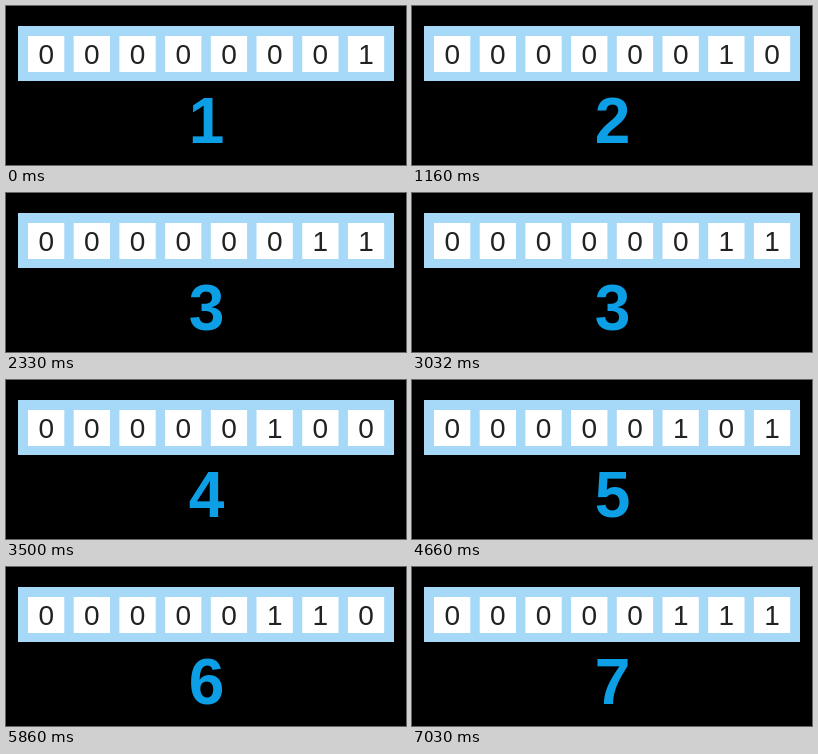
Animation, 400 px wide and 159 px high, one loop 8000 ms. Source, as an HTML page:

```html
<!DOCTYPE html>
<html lang="en">
<head>
<meta charset="utf-8">
<title>Binary counter</title>
<style>
  html, body { margin: 0; width: 100%; height: 100%; overflow: hidden; background: #000; }
  svg { display: block; width: 100vw; height: 100vh; }
  text { font-family: "Liberation Sans", Arial, sans-serif; text-anchor: middle; }
  .bit { font-size: 28px; fill: #222; }
  #value { font-size: 64px; font-weight: bold; fill: #0c9fe5; }
</style>
</head>
<body>
<svg viewBox="0 0 400 159">
  <rect x="12" y="20" width="376" height="55" fill="#a5d9f7"/>
  <g id="cells"></g>
  <text id="value" x="200.5" y="137"></text>
</svg>
<script>
const BITS = 8, PITCH = 45.7, LOOP = 8000;
const steps = [1160, 2330, 3500, 4660, 5860, 7030];
const cells = document.getElementById("cells");
const value = document.getElementById("value");

function add(name, attributes) {
  const node = document.createElementNS("http://www.w3.org/2000/svg", name);
  for (const key in attributes) node.setAttribute(key, attributes[key]);
  return cells.appendChild(node);
}

const bits = Array.from({ length: BITS }, (_, i) => {
  const x = 22 + i * PITCH;
  add("rect", { x, y: 30, width: 36.3, height: 36, fill: "#fff" });
  return add("text", { class: "bit", x: x + 18.2, y: 57.5 });
});

let shown = 0;
function draw(now) {
  const time = now % LOOP;
  const count = 1 + steps.filter(step => time >= step).length;
  if (count !== shown) {
    shown = count;
    value.textContent = count;
    const digits = count.toString(2).padStart(BITS, "0");
    bits.forEach((bit, i) => bit.textContent = digits[i]);
  }
  requestAnimationFrame(draw);
}
draw(0);
</script>
</body>
</html>
```
